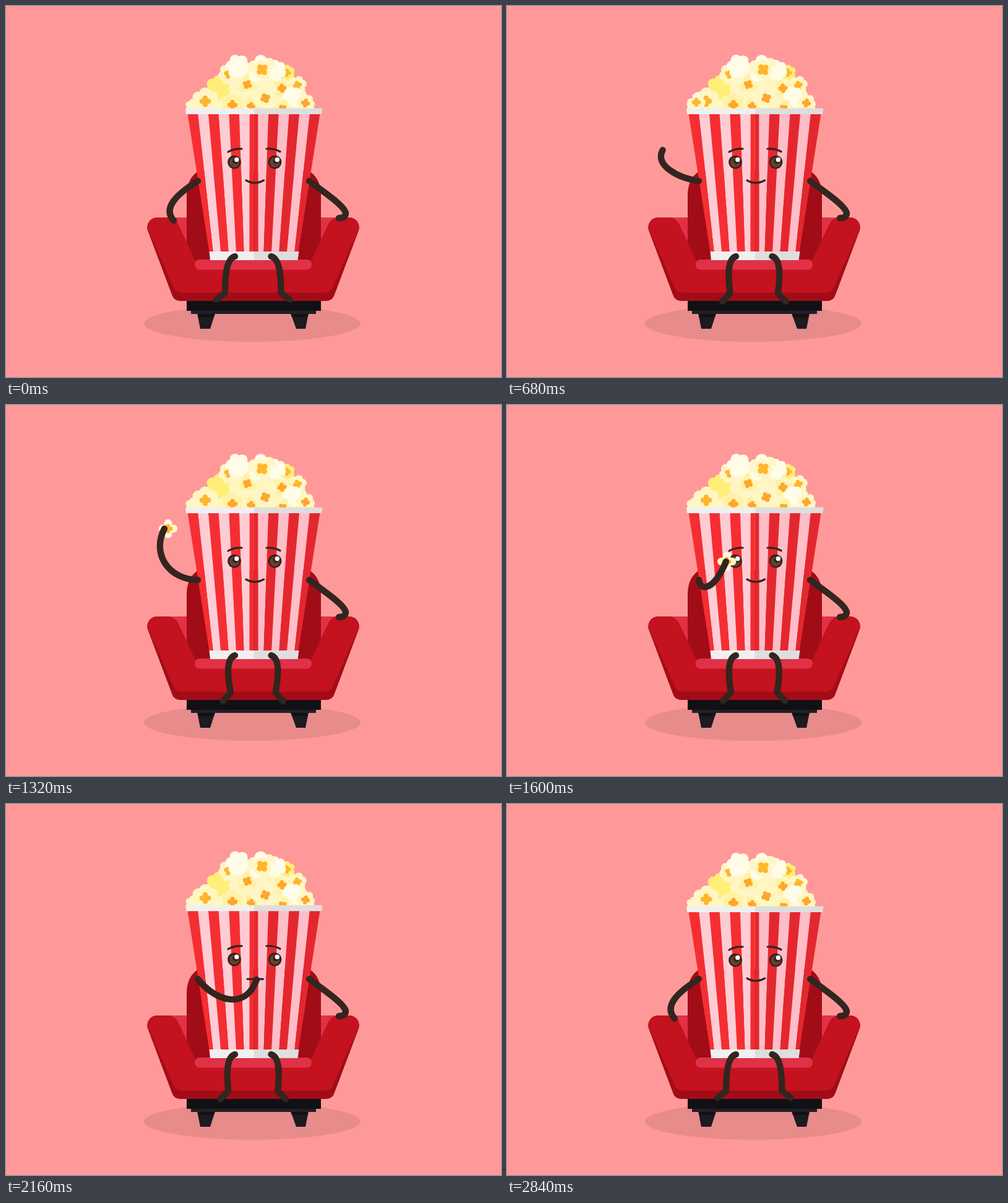
An HTML page for the animation above (2880 ms loop, 800 by 600 pixels).

```html
<!DOCTYPE html>
<html lang="en">
<head>
<meta charset="utf-8">
<title>Popcorn on an armchair</title>
<style>
html, body { margin: 0; width: 100%; height: 100%; overflow: hidden; background: #ff9999; }
svg { display: block; width: 100vw; height: 100vh; }
.line { fill: none; stroke: #33251f; stroke-width: 10.3; stroke-linecap: round; stroke-linejoin: round; }
.thin { stroke-width: 3.2; }
</style>
</head>
<body>
<svg viewBox="0 0 800 600">
  <defs>
    <clipPath id="aboveRim"><path d="M270 50H530V168H270z"/></clipPath>
    <g id="eye">
      <circle r="10.8" fill="#33221c"/>
      <circle cy=".5" r="8" fill="#66412f"/>
      <circle cx="2" cy="-2" r="5" fill="#33221c"/>
      <circle cx="3.8" cy="-4" r="3.7" fill="#fff"/>
    </g>
    <g id="piece"></g>
  </defs>

  <ellipse cx="398" cy="513.5" rx="175" ry="29.5" fill="#e88b8b"/>
  <g id="chair">
    <path fill="#1b1b20" d="M309 497H338L330 522H314zM460 497H489L484 522H469z"/>
    <path fill="#111115" d="M292 476H509V493H292zM309 497H338L336 503H311zM460 497H489L487 503H462z"/>
    <path fill="#202027" d="M299 493H501V498H299z"/>
    <path fill="#e03147" d="M260 342H300V420H260zM500 342H540V420H500z"/>
    <path fill="#a20c17" d="M292 420V304Q293 278 311 267H490Q508 278 509 304V420z"/>
    <path fill="#a20c17" d="M244 342H262Q273 343 278 353L306 412H493L521 353Q526 343 537 342H555A16 16 0 0 1 570 363L530.500 468A13 13 0 0 1 518 477H281A13 13 0 0 1 268.500 468L229 363A16 16 0 0 1 244 342z"/>
    <path fill="#c4121e" d="M244 342H262Q273 343 278 353L306 412H493L521 353Q526 343 537 342H555A16 16 0 0 1 570 361L528.500 454.500A13 13 0 0 1 516 463.500H283A13 13 0 0 1 270.500 454.500L229 361A16 16 0 0 1 244 342z"/>
    <rect x="305" y="410" width="189" height="16.5" rx="8" fill="#e03147"/>
  </g>

  <g id="body">
    <g id="popcorn" clip-path="url(#aboveRim)"></g>
    <use href="#piece" id="loosePiece"/>
    <g id="stripes"></g>
    <path fill="#f0f0f0" d="M290 165.500H401V175H291zM328.500 397H401V411H330z"/>
    <path fill="#dedede" d="M401 165.500H511.500L510 175H401zM401 397H473.500L471.500 411H401z"/>
    <use href="#eye" x="369" y="252.5"/>
    <use href="#eye" x="434.5" y="252.5"/>
    <path class="line thin" d="M359 236Q368 230.500 381 231M421 231Q433 230 443 235.500"/>
    <path class="line thin" id="mouth"/>
  </g>

  <path class="line" d="M490 283C515 302 547 323 549 335Q549 343 538 343"/>
  <path class="line" id="leftLeg"/>
  <path class="line" id="rightLeg"/>
  <use href="#piece" id="heldPiece"/>
  <path class="line" id="arm"/>
</svg>
<script>
const LOOP = 2880, STEP = 40;
const el = id => document.getElementById(id);
const clamp = (v, min, max) => Math.max(min, Math.min(max, v));
const lerp = (a, b, p) => a + (b - a) * p;
const smooth = (from, to, t) => { const p = clamp((t - from) / (to - from), 0, 1); return p * p * (3 - 2 * p); };

const circle = (x, y, r, color) => `<circle cx="${x}" cy="${y}" r="${r}" fill="${color}"/>`;

// A ring of overlapping lobes around (x, y), in alternating colours.
function ring(x, y, count, distance, r, colors, turn = 0) {
  let out = '';
  for (let i = 0; i < count; i++) {
    const angle = turn + i / count * 2 * Math.PI;
    out += circle(x + distance * Math.cos(angle), y + distance * Math.sin(angle), r, colors[i % colors.length]);
  }
  return out;
}

const WHITE = '#fffce8', CREAM = '#fff6c4', PALE = '#fff2a4', YELLOW = '#ffef78';
const GOLD = '#ffb62c', ORANGE = '#ffa62b';

function kernel(x, y, size, colors, heart, lobes = 6) {
  const heartSize = 2.5 + size * 0.3;
  return ring(x, y, lobes, size * 0.58, size * 0.43, colors, x)
    + circle(x, y, size * 0.62, colors[0])
    + (heart ? ring(x, y, 4, heartSize * 0.57, heartSize * 0.46, [heart], x) + circle(x, y, heartSize * 0.5, heart) : '');
}

el('popcorn').innerHTML =
  `<path fill="${CREAM}" d="M294 168L320 138 350 104H440L478 128 500 168z"/>` +
  kernel(454, 108, 13, [YELLOW], GOLD) +
  kernel(343, 132, 20, [YELLOW]) +
  kernel(360, 110, 17, [CREAM], GOLD) +
  kernel(375, 98, 20, [WHITE]) +
  kernel(471, 128, 15, [CREAM], GOLD) +
  kernel(390, 127, 16, [PALE, CREAM], ORANGE) +
  kernel(446, 133, 16, [PALE, CREAM], ORANGE) +
  kernel(436, 104, 17, [WHITE]) +
  kernel(414, 103, 24, [CREAM, WHITE], GOLD) +
  kernel(366, 160, 18, [PALE], ORANGE) +
  kernel(396, 162, 14, [PALE, CREAM], ORANGE) +
  kernel(463, 147, 17, [WHITE]) +
  kernel(419, 149, 18, [CREAM], ORANGE) +
  kernel(447, 166, 15, [PALE, CREAM], ORANGE) +
  kernel(484, 157, 15, [CREAM], ORANGE) +
  kernel(302, 162, 12, [CREAM]) +
  kernel(322, 154, 22, [CREAM], GOLD);

el('piece').innerHTML = kernel(0, 0, 15, [CREAM, WHITE], GOLD, 4);

// Stripe edges are measured from the bucket's middle line.
const shades = { '-1': ['#f52e33', '#ffccd4'], 1: ['#e4272e', '#ffbdc7'] };
for (const side of [-1, 1])
  for (let i = 0; i < 7; i++) {
    const top = n => 400.5 + side * (n && 7 + (n - 1) * 16.67);
    const bottom = n => 400.5 + side * (n && clamp(3.6 + (n - 1) * 12.45, 7, 72));
    el('stripes').innerHTML += `<path fill="${shades[side][i % 2]}" d="M${top(i)} 174H${top(i + 1)}L${bottom(i + 1)} 398H${bottom(i)}z"/>`;
  }

// Each pose: two curve handles and the hand; the shoulder stays put.
const poses = {
  rest: [278, 303, 252, 326, 271, 347],
  wave: [285, 290, 238, 302, 264, 308],
  raise: [276, 286, 236, 275, 241, 255],
  grab: [272, 250, 247, 192, 290, 153],
  lift: [262, 282, 235, 240, 256, 200],
  offer: [335, 312, 378, 324, 396, 276],
  bite: [337, 318, 387, 335, 405, 284]
};
const timeline = [
  [0, 'rest'], [80, 'rest'], [400, 'wave'], [560, 'raise'], [960, 'grab'], [1040, 'grab'],
  [1320, 'lift'], [1760, 'offer'], [1880, 'offer'], [2000, 'bite'], [2240, 'bite'], [2760, 'rest'], [LOOP, 'rest']
];

function armPose(t) {
  const next = timeline.findIndex(([time]) => time > t);
  const [from, a] = timeline[next - 1], [to, b] = timeline[next];
  const p = smooth(from, to, t);
  return poses[a].map((v, i) => lerp(v, poses[b][i], p));
}

function place(id, visible, x, y, scale) {
  el(id).setAttribute('visibility', visible ? 'visible' : 'hidden');
  el(id).setAttribute('transform', `translate(${x} ${y}) scale(${scale})`);
}

function draw(t) {
  const swing = (1 - Math.cos(2 * Math.PI * t / 960)) / 2;
  const leg = flip => {
    const point = (x, y, dx, dy) => `${flip ? 798.5 - x - dx * swing : x + dx * swing} ${y + dy * swing}`;
    return `M${point(370, 405, 0, 0)}C${point(357, 408, -2, 2)} ${point(354, 434, 5, 6)} ${point(354, 464, 10.5, 1)}L${point(340, 475, 12.5, 4.5)}`;
  };
  el('leftLeg').setAttribute('d', leg(false));
  el('rightLeg').setAttribute('d', leg(true));

  const [c1x, c1y, c2x, c2y, hx, hy] = armPose(t);
  el('arm').setAttribute('d', `M310 283C${c1x} ${c1y} ${c2x} ${c2y} ${hx} ${hy}`);

  const roll = smooth(200, 1000, t);
  place('loosePiece', t > 200 && t < 1040, lerp(317, 300, roll), lerp(148, 160, roll), smooth(200, 360, t));
  const grip = 1 - smooth(1040, 1320, t);
  const reach = 1 - smooth(1320, 1720, t);
  place('heldPiece', t >= 1040 && t < 2000, hx + 6 * reach + 4 * grip, hy + 7 * grip, 1 - smooth(1900, 2000, t));

  const bounce = Math.cos(Math.PI * clamp((t - 2260) / 310, -0.5, 0.5)) ** 2;
  el('body').setAttribute('transform', `translate(0 410) scale(1 ${1 + 0.027 * bounce}) translate(0 -410)`);

  const flat = smooth(1600, 1800, t) - smooth(2400, 2600, t);
  const open = smooth(1640, 1840, t) - smooth(1920, 2060, t);
  const cornerY = 282 + 2 * flat;
  el('mouth').setAttribute('d', `M${388 + 2 * flat} ${cornerY}Q402 ${lerp(290, 284, flat)} ${416.5 - flat} ${cornerY}`);
  el('mouth').style.strokeWidth = 3.2 + 3.3 * open;
}

function tick() {
  draw(Math.floor(performance.now() % LOOP / STEP) * STEP);
  requestAnimationFrame(tick);
}
tick();
</script>
</body>
</html>
```
